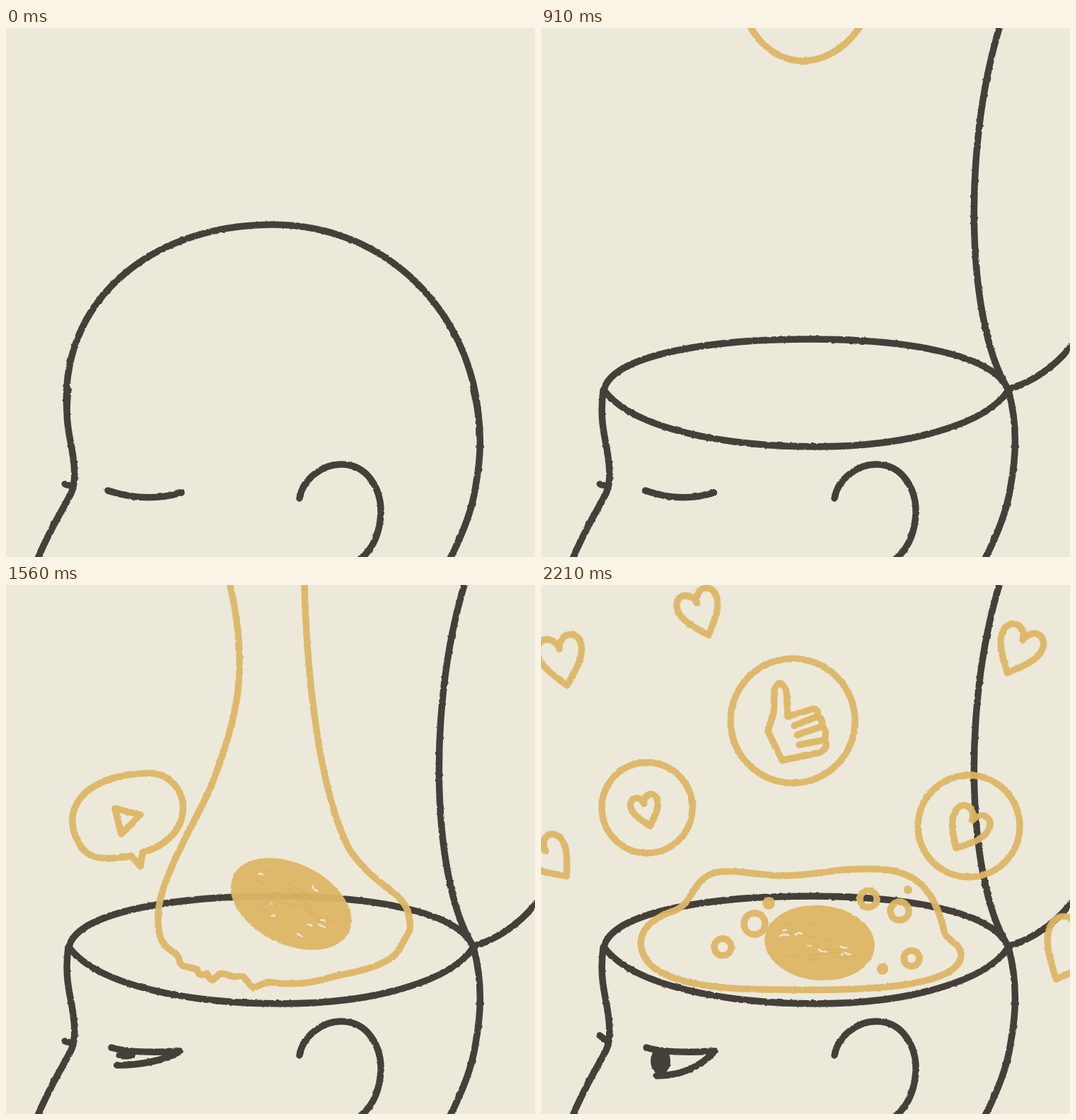
An HTML page that plays this animation: 748 px wide and 748 px high, repeating every 2340 ms.

```html
<!DOCTYPE html>
<html lang="en">
<head>
<meta charset="utf-8">
<title>Open mind</title>
<style>
html, body { margin: 0; height: 100%; overflow: hidden; background: #ece9db; }
svg { display: block; width: 100vw; height: 100vh; }
path, circle, rect, ellipse { fill: none; stroke-width: 9.5; stroke-linecap: round; stroke-linejoin: round; }
.ink { stroke: #453f3a; }
.gold { stroke: #deb766; opacity: .95; }
.ink .solid { fill: #453f3a; stroke: none; }
.gold .solid { fill: #deb766; stroke: none; }
.cap { fill: #ece9db; }
.scribble { stroke: #d2aa56; stroke-width: 1.5; opacity: .6; }
.fleck { stroke: #f0ead8; stroke-width: 2.5; }
</style>
</head>
<body>
<svg viewBox="0 0 748 748">
  <filter id="rough" filterUnits="userSpaceOnUse" x="0" y="0" width="748" height="748" color-interpolation-filters="sRGB">
    <feTurbulence type="fractalNoise" baseFrequency=".18" numOctaves="2" seed="4" result="noise"/>
    <feDisplacementMap in="SourceGraphic" in2="noise" scale="2.6" xChannelSelector="R" yChannelSelector="G"/>
  </filter>
  <g filter="url(#rough)">
    <g class="ink" id="ink"></g>
    <g class="gold" id="gold"></g>
  </g>
</svg>
<script>
const STEP = 130, STEPS = 18;
const ink = document.getElementById('ink'), gold = document.getElementById('gold');

const path = (d, cls = '') => `<path class="${cls}" d="${d}"/>`;
const ring = (x, y, r) => `<circle cx="${x}" cy="${y}" r="${r}"/>`;
const blob = (x, y, rx, ry = rx) => `<ellipse class="solid" cx="${x}" cy="${y}" rx="${rx}" ry="${ry}"/>`;
const place = (x, y, rot, body) => `<g transform="translate(${x} ${y}) rotate(${rot})">${body}</g>`;
const outline = pts => 'M' + pts.map(p => p.map(v => v.toFixed(1))).join('L') + 'Z';
const mix = (a, b, t) => a.map((v, i) => Array.isArray(v) ? mix(v, b[i], t) : v + (b[i] - v) * t);

// Evenly spaced points along a path, so that two outlines can be mixed
function sample(d, n = 240) {
  const el = document.createElementNS('http://www.w3.org/2000/svg', 'path');
  el.setAttribute('d', d);
  const len = el.getTotalLength();
  return Array.from({ length: n }, (_, i) => {
    const q = el.getPointAtLength(len * i / n);
    return [q.x, q.y];
  });
}

// Pose at step k between [step, shape] keys
function pose(keys, k) {
  const i = Math.max(1, keys.findIndex(([at]) => at >= k));
  const [[k0, a], [k1, b]] = [keys[i - 1], keys[i]];
  return mix(a, b, (k - k0) / (k1 - k0));
}

// Head
const dome = 'M86 540C76 390 200 279 375 278S670 420 669 575';
const face = 'M88 512C82 560 92 580 95 608C98 628 98 645 92 658C78 685 62 709 45 750';
const nape = 'M661 512C675 565 671 610 664 648C659 684 645 717 628 750';
const ear = 'M415 665C420 637 448 617 474 617C512 617 531 653 530 687C528 718 518 737 502 750';
const rimBack = 'M89 512C100 462 240 440 380 440S640 462 661 512';
const frontCurve = 'C130 567 260 592 390 592S630 560 661 512';
const capShut = 'M662 510C655 400 550 277 375 278C200 279 88 390 88 512' + frontCurve;
const capAjar = 'M662 510C668 370 560 250 357 250C250 252 142 330 142 362C150 400 300 530 520 535Q600 534 662 511';
const capOpen = 'M660 510C604 420 594 180 648 0L665 -60H900V300L748 452Q712 495 663 510';
const capLift = outline(mix(sample(capShut), sample(capAjar), .45));

function cap(k) {
  if (k > 4) return path(capOpen, 'cap');
  if (k < 2) return path(capLift, 'cap');
  return `<g transform="rotate(${28 * (k - 2)} 662 511)">${path(capAjar, 'cap')}</g>`;
}

function eye(k) {
  if (k < 11) {
    const x = 144 + Math.min(k, 5) * .7;
    return path(`M${x} 654Q198 672 ${392 - x} 657`);
  }
  const o = 1 - (1 - Math.min(1, (k - 10) / 6)) ** 2;
  const x = 149 + 14 * o, y = 660 + 34 * o;
  return path('M149 654Q178 663 246 659') + path(`M${x} ${y}Q${207 + 6 * o} ${y} 245 660`) +
    blob(169, 655 + 18 * o, 14, 19 * o * o);
}

function head(k) {
  const nose = path(k > 15 ? 'M83 637L95 646' : 'M83 645L94 648');
  const top = k ? path(rimBack) + cap(k) + path('M89 512' + frontCurve) : path(dome);
  return top + path(face) + path(nape) + path(ear) + nose + eye(k);
}

// Egg: outline of the white, and the yolk as [x, y, rx, ry, turn]
const drop = 'M370 -80C330 -80 316 -40 316 10C314 60 285 110 285 190C286 240 325 282 370 282C425 282 472 225 472 165C470 110 437 50 431 0C428 -40 410 -80 370 -80Z';
const splat = 'M370 -80C330 -80 300 -50 317 0C345 130 325 190 290 285C260 350 215 420 215 470C215 500 220 510 243 523l4 15 23 5 4 10 10 -4 6 11 15 -12 14 6 16 -1 14 17 22 -9C420 570 455 555 470 552S545 540 558 512S575 495 568 460C555 430 520 425 485 373C447 300 426 150 422 0C426 -50 410 -80 370 -80Z';
const hump = 'M370 315C315 315 300 430 262 447C215 460 180 470 180 502C185 555 270 550 310 556C345 570 365 573 385 573C460 570 480 545 550 536C572 530 560 525 565 515C590 505 606 485 606 450C605 415 585 405 565 405C515 405 490 440 455 440C420 435 422 315 370 315Z';
const settled = 'M340 411C300 410 280 402 250 406C215 412 215 450 190 460C160 470 141 485 141 508C145 550 200 572 330 572C440 574 594 572 594 522C592 505 575 505 570 490C550 400 500 400 440 402C410 403 380 411 340 411Z';
const white = [[9, sample(drop)], [12, sample(splat)], [14, sample(hump)], [17, sample(settled)]];
const yolk = [
  [9, [370, 97, 78, 46, -78]],
  [12, [403, 451, 91, 57, 26]],
  [14, [405, 487, 76, 52, 18]],
  [17, [394, 506, 78, 53, 5]]
];

function texture(rx, ry, k) {
  let seed = k * 97 + 5, out = '';
  const rnd = () => (seed = seed * 16807 % 2147483647) / 2147483647;
  for (let i = 0; i < 24; i++) {
    const a = rnd() * 2 * Math.PI, r = .1 + rnd() * .6, bend = rnd() * 12 - 6;
    const fleck = k > 11 && i < 8, w = (fleck ? 4 : 14) + rnd() * 8;
    out += path(`M${rx * r * Math.cos(a) - w / 2} ${ry * r * Math.sin(a)}q${w / 2} ${bend} ${w} ${bend / 2}`,
      fleck ? 'fleck' : 'scribble');
  }
  return out;
}

function egg(k) {
  const at = Math.max(k, 9);
  const rise = k < 9 ? 265 * (1 - ((k - 6) / 3) ** 2) : 0;
  const [x, y, rx, ry, turn] = pose(yolk, at);
  return place(0, -rise, 0, path(outline(pose(white, at))) +
    place(x, y, turn, blob(0, 0, rx, ry) + texture(rx, ry, at)));
}

// Bubbles as x,y,r; the smallest are filled
const early = '300,505,20 327,476,18 253,526,14 340,545,15 402,543,11 542,481,14 295,468,7';
const late = '302,479,18 257,512,15 463,444,15 507,461,16 524,528,14 322,450,9 519,431,6 483,543,8';

function fizz(k) {
  if (k < 13) return '';
  const rising = k < 16, dy = 6 * ((rising ? 14 : 17) - k);
  return place(0, dy, 0, (rising ? early : late).split(' ').map(b => {
    const [x, y, r] = b.split(',').map(Number);
    return r < 10 ? blob(x, y, r) : ring(x, y, r - 3);
  }).join(''));
}

// Icons
const heart = (x, y, size, rot) => place(x, y, rot, path(
  'M0 36C-14 20 -30 4 -30 -13C-30 -36 -4 -36 0 -14C4 -36 30 -36 30 -13C30 4 14 20 0 36Z'
    .replace(/-?\d+/g, v => (v * size).toFixed(1))));
const speech = path('M177 383C150 388 125 390 110 375C70 325 105 266 205 266C260 270 275 355 193 378L190 398Z') +
  path('M154 316L190 325L163 352Z');
const camera = place(483.5, 219.5, 23, '<rect x="-82" y="-57" width="164" height="114" rx="14"/>') +
  path('M447 195L436 234L513 265L527 229L499 217L507 193L487 186L480 205ZM467 181L462 194') + blob(482, 227, 10);
const thumb = ring(356, 192, 88) +
  path('M349 186L347 151Q338 128 330 148L329 180L321 207L341 248L394 237Q408 230 401 219L365 226' +
    'M349 186L385 175Q394 176 390 186L358 199M390 186Q400 190 397 200L362 212M397 200Q405 206 401 219');
const loved = ring(258, 368, 62) + heart(258, 369, .72, -30);
const likes = ring(150, 315, 64) + heart(148, 318, .65, -15);
const adored = ring(605, 341, 72) + heart(603, 344, .9, 30);
const hearts = heart(225, 38, .97, -20) + heart(29, 105, 1.05, -12) + heart(675, 91, 1.02, 25) +
  heart(15, 386, .92, -40) + heart(748, 515, 1.3, 25);

// Each icon drifts by (dx, dy) per step and sits at its drawn place on step `home`
const floaters = [
  { body: speech, from: 12, to: 13, home: 12, dx: -8, dy: -60 },
  { body: camera, from: 13, to: 15, home: 14, dx: -4, dy: -75 },
  { body: loved, from: 14, to: 15, home: 14, dx: -36, dy: -18 },
  { body: likes, from: 16, to: 17, home: 17, dx: -36, dy: -18 },
  { body: thumb, from: 16, to: 17, home: 17, dx: 0, dy: -55 },
  { body: adored, from: 16, to: 17, home: 17, dx: 6, dy: -40 },
  { body: hearts, from: 16, to: 17, home: 17, dx: 0, dy: -45 }
];
const icons = k => floaters.filter(f => k >= f.from && k <= f.to)
  .map(f => place(f.dx * (k - f.home), f.dy * (k - f.home), 0, f.body)).join('');

let shown = -1, start;
function tick(now) {
  start ??= now;
  const k = Math.floor((now - start) / STEP) % STEPS;
  if (k !== shown) {
    shown = k;
    ink.innerHTML = head(k);
    gold.innerHTML = k < 6 ? '' : egg(k) + fizz(k) + icons(k);
  }
  requestAnimationFrame(tick);
}
requestAnimationFrame(tick);
</script>
</body>
</html>
```
